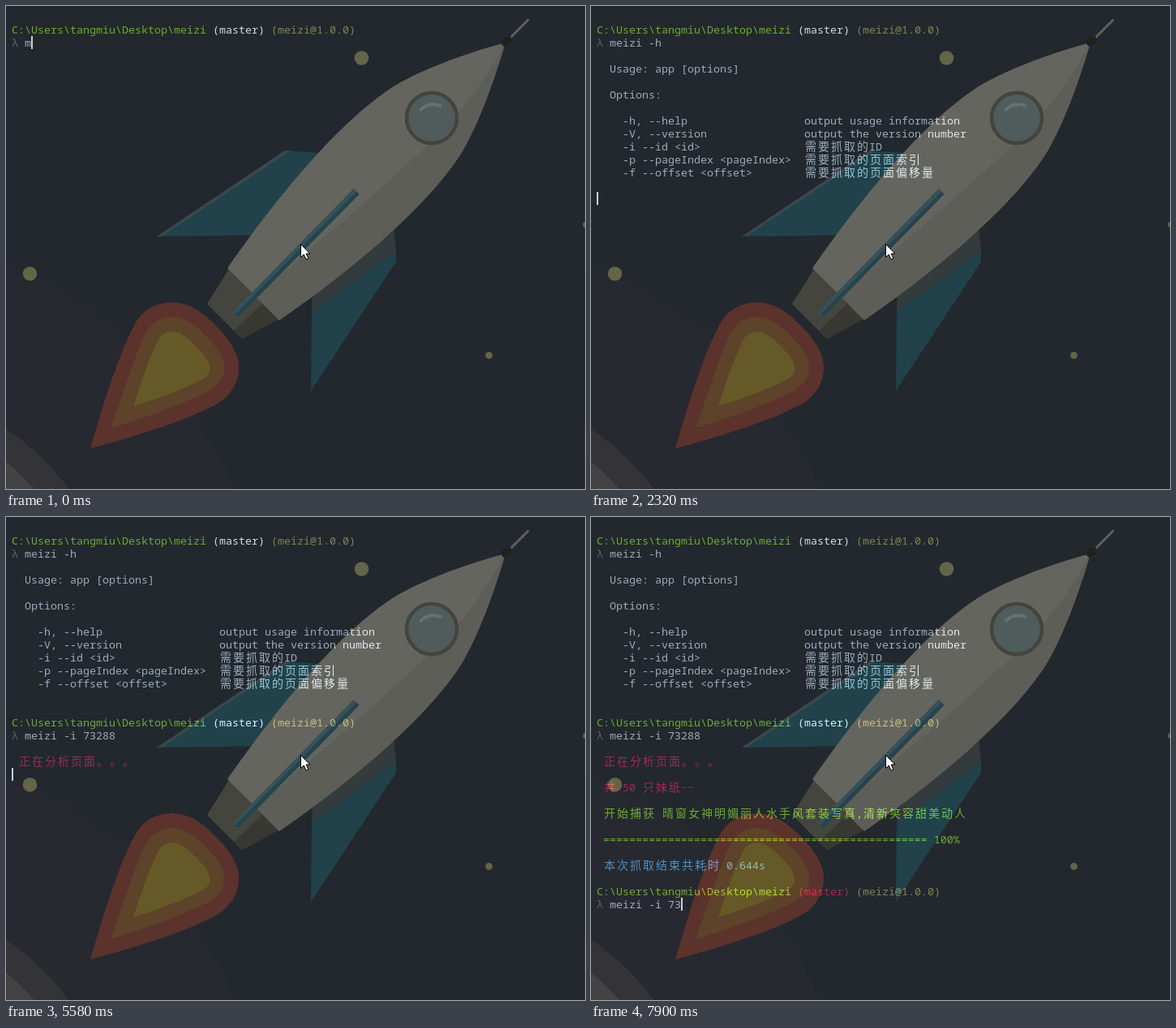
An HTML page that plays this animation: 714x595 px, repeating every 8 s.

```html
<!DOCTYPE html>
<html lang="zh-CN">
<head>
<meta charset="utf-8">
<title>Terminal</title>
<style>
  html, body { margin: 0; width: 714px; height: 595px; overflow: hidden; background: #22282e; }
  svg, #term { position: absolute; left: 0; top: 0; width: 714px; height: 595px; }
  #term { mix-blend-mode: plus-lighter; font: 13.3333px/16px "Noto Sans Mono", monospace; }
  #term div { position: absolute; height: 16px; white-space: pre; }
  #term span {
    position: relative; left: 1px; letter-spacing: 2px; text-spacing-trim: space-all;
    font: 300 14px/0 "Noto Sans CJK SC", "Noto Sans CJK", sans-serif;
    font-feature-settings: "chws" 0, "halt" 0;
  }
  #caret { width: 2px; background: #a4a6a8; }
</style>
</head>
<body>
<svg viewBox="0 0 714 595">
  <g id="planet">
    <circle cx="-181" cy="787" r="501" fill="#262930"/>
    <circle cx="-181" cy="787" r="322" fill="#343438"/>
    <circle cx="-181" cy="787" r="289" fill="#434346"/>
  </g>
  <g id="stars" fill="#636546">
    <circle cx="438.5" cy="64" r="8.8"/>
    <circle cx="29.5" cy="329.7" r="8.8"/>
    <circle cx="595.5" cy="430.3" r="4.4"/>
    <circle cx="715" cy="269.5" r="3.6"/>
  </g>
  <g id="flame">
    <path fill="#5c322d" d="M104 545C120 490 140 425 161 388C170 374 186 365 204 365C226 365 243 377 262 397C280 416 288 432 287 448C286 466 276 480 262 489C225 510 160 530 104 545"/>
    <path fill="#5d4329" d="M129 520C142 485 157 435 171 405C180 388 193 383 205 383C220 383 234 393 248 408C264 424 270 436 269 448C268 460 261 468 250 474C215 492 170 508 129 520"/>
    <path fill="#655928" d="M157 493C166 465 176 435 187 413C191 404 198 401 206 401C215 401 225 410 236 421C247 432 252 440 251 449C250 455 245 459 238 462C212 475 185 484 157 493"/>
  </g>
  <g id="fins">
    <path fill="#21424a" d="M344 178L400 182L320 282L186 284ZM481 302V315L376 474L377 376Z"/>
    <path fill="#3b484e" d="M344 178H351L193 283L186 284Z"/>
    <path fill="#343b3d" d="M478 270L481 302L377 376L378 350Z"/>
  </g>
  <g id="rocket">
    <path fill="#45453f" d="M275 324L248 367L291 410L335 386Z"/>
    <path fill="#383832" d="M281 400L291 410L336 386L319 364Z"/>
    <path fill="#65655f" d="M616 45C565 59 515 77 478 99C405 146 325 248 273 323L337 387C412 335 514 255 561 182C583 145 601 95 616 45Z"/>
    <path fill="#5e5e58" d="M616 45C580 112 545 149 513 178C440 246 370 304 308 358L337 387C412 335 514 255 561 182C583 145 601 95 616 45Z"/>
    <path stroke="#3a5058" stroke-width="5" d="M281.5 378.5L430.5 226.5"/>
    <path stroke="#23454e" stroke-width="5" d="M284.5 381.5L434 230"/>
    <circle cx="525" cy="138" r="31" fill="#505c5c" stroke="#44443f" stroke-width="4.5"/>
    <path fill="none" stroke="#69716f" stroke-width="4" d="M510.500 129Q521 117 537 123.500"/>
    <path stroke="#60605c" stroke-width="3" d="M617 44L644.500 16.500"/>
    <path fill="#20211d" d="M611 41L615 38L618 39L622 37L624 42L622 46L618 48L614 50L611 47Z"/>
  </g>
</svg>
<div id="term"><div id="caret"></div></div>
<svg viewBox="0 0 714 595">
  <path fill="#fff" stroke="#000" d="M363.500 293.500V309.500L367.300 306L370 312.200L372.800 311L370.200 305H375Z"/>
</svg>
<script>
const LOOP = 8000;
const GREY = '#79838d', GREEN = '#4b8200', WHITE = '#b0b2ba', OLIVE = '#605b24',
      DIM = '#3a3a3a', RED = '#800024', BLUE = '#286695';
const term = document.getElementById('term');
const caret = document.getElementById('caret');
const lines = [];

function place(el, row, col) {
  el.style.left = 7 + 8 * col + 'px';
  el.style.top = 5 + 16 * row + 'px';
}

// Wide characters go in spans so they fill two columns.
function print(time, row, col, color, text = '') {
  const el = document.createElement('div');
  text.split(/([\u3000-\u9fff]+)/).forEach((part, i) => {
    if (i % 2) el.appendChild(document.createElement('span')).textContent = part;
    else el.append(part);
  });
  el.style.color = color;
  place(el, row, col);
  term.append(el);
  lines.push({ time, el });
  return el;
}

function prompt(time, row, branchColor = WHITE, inputTime = time) {
  print(time, row, 0, GREEN, 'C:\\Users\\tangmiu\\Desktop\\meizi');
  print(time, row, 31, branchColor, '(master)');
  print(time, row, 40, OLIVE, '(meizi@1.0.0)');
  print(inputTime, row + 1, 0, DIM, 'λ');
}

prompt(0, 1);
print(2320, 4, 2, GREY, 'Usage: app [options]');
print(2320, 6, 2, GREY, 'Options:');
[
  ['-h, --help', 'output usage information'],
  ['-V, --version', 'output the version number'],
  ['-i --id <id>', '需要抓取的ID'],
  ['-p --pageIndex <pageIndex>', '需要抓取的页面索引'],
  ['-f --offset <offset>', '需要抓取的页面偏移量']
].forEach(([flag, help], i) => {
  print(2320, 8 + i, 4, GREY, flag);
  print(2320, 8 + i, 32, GREY, help);
});
prompt(2470, 15);
print(5580, 18, 1, RED, '正在分析页面。。。');
print(5730, 20, 1, RED, '共 50 只妹纸~~');
print(5880, 22, 1, GREEN, '开始捕获 晴窗女神明媚丽人水手风套装写真,清新笑容甜美动人');
print(6160, 24, 1, GREEN, '='.repeat(50) + ' 100%');
print(6160, 26, 1, BLUE, '本次抓取结束共耗时 0.644s');
prompt(6460, 28, RED, 6610);

// [time, row, input]; without input the caret waits at the line start.
const steps = [
  [0, 2, 'm'], [150, 2, 'me'], [450, 2, 'mei'], [600, 2, 'meiz'], [750, 2, 'meizi'],
  [1020, 2, 'meizi '], [1300, 2, 'meizi -'], [1860, 2, 'meizi -h'],
  [2010, 3], [2320, 14], [2470, 16, ''],
  [2750, 16, 'meizi -h'], [3160, 16, 'meizi -'], [3620, 16, 'meizi -i'], [3770, 16, 'meizi -i '],
  [4210, 16, 'meizi -i 7'], [4330, 16, 'meizi -i 73'], [4480, 16, 'meizi -i 732'],
  [4890, 16, 'meizi -i 7328'], [5030, 16, 'meizi -i 73288'],
  [5460, 17], [5580, 19], [5730, 21], [5880, 24], [6160, 27], [6460, 29], [6610, 29, ''],
  [7150, 29, 'meizi -i 73288'], [7610, 29, 'meizi -i 7328'], [7760, 29, 'meizi -i 732'],
  [7900, 29, 'meizi -i 73']
];
const inputs = {};
for (const row of [2, 16, 29]) inputs[row] = print(0, row, 2, GREY);

function draw() {
  const now = performance.now() % LOOP;
  for (const { time, el } of lines) el.style.visibility = now < time ? 'hidden' : 'visible';
  const typed = { 2: '', 16: '', 29: '' };
  for (const [time, row, text] of steps) {
    if (time > now) break;
    if (text !== undefined) typed[row] = text;
    place(caret, row, text === undefined ? 0 : text.length + 2);
  }
  for (const row in inputs) inputs[row].textContent = typed[row];
  requestAnimationFrame(draw);
}
draw();
</script>
</body>
</html>
```
